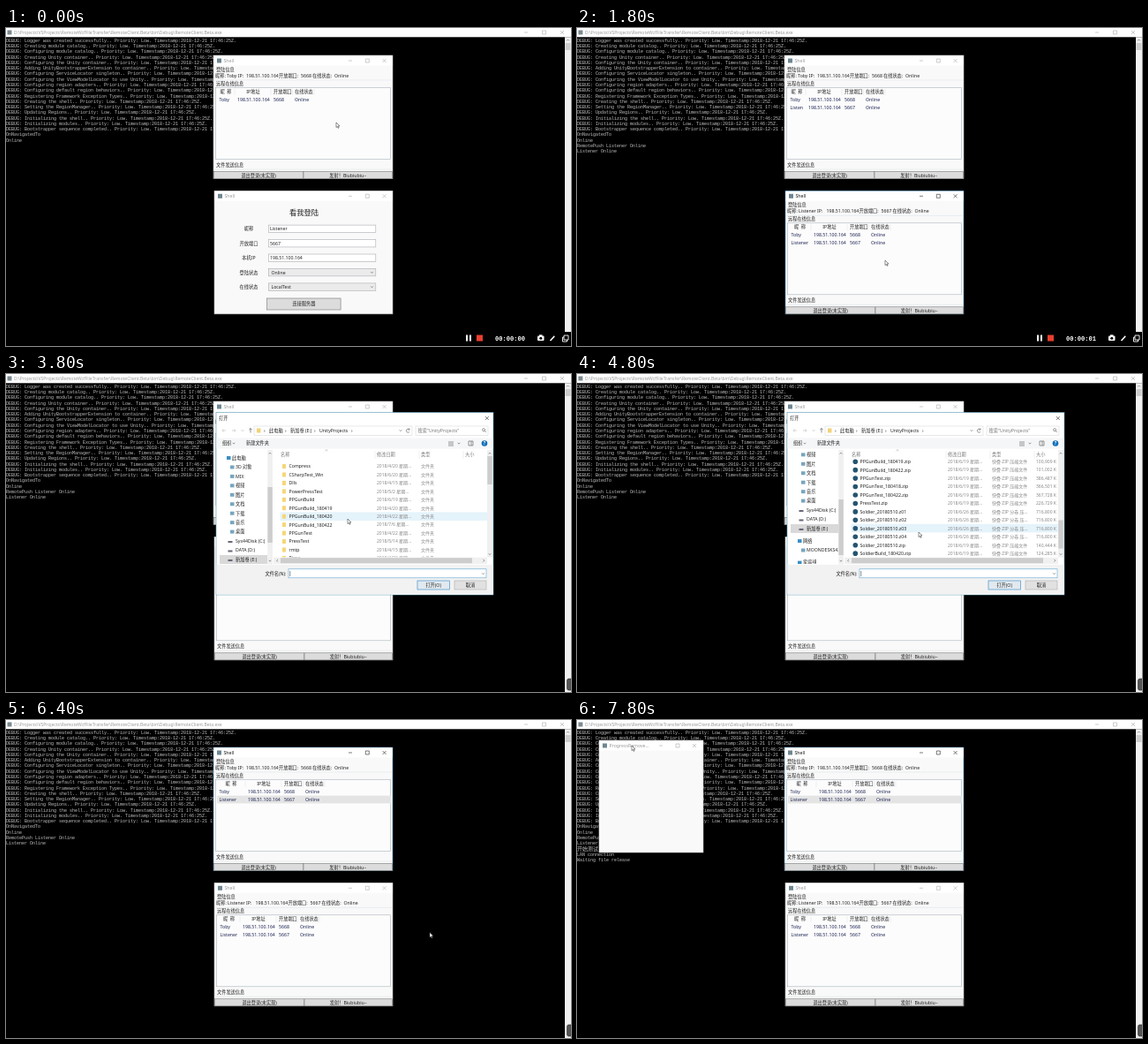
An HTML page that plays this animation: 640x360 px, repeating every 8000 ms.

```html
<!DOCTYPE html>
<html lang="zh">
<head>
<meta charset="utf-8">
<style>
html, body { margin: 0; width: 100%; height: 100%; overflow: hidden; background: #000; }
svg { display: block; width: 640px; height: 360px; font-family: "Noto Sans", "Noto Sans CJK SC", "Noto Sans CJK", sans-serif; }
text { white-space: pre; }
.mono { font-family: "Liberation Mono", "Noto Sans CJK SC", "Noto Sans CJK", monospace; }
.frame { stroke: #bbb; }
.title { fill: #999; }
.buttons { stroke: #aaa; }
.active .frame { stroke: #3f86b5; }
.active .title { fill: #111; }
.active .buttons { stroke: #222; }
</style>
</head>
<body>
<svg id="stage" viewBox="0 0 640 360"></svg>
<script>
const LOOP = 8000, STEP = 200;
const USER = 'Toby', PEER = 'Listener', IP = '198.51.100.164';
const ROW = 9.45, LAST_SCROLL = 251, SIDE_SCROLL = 35;

// y is the vertical middle of the text
const text = (x, y, s, { size = 5.2, fill = '#222', anchor = 'start', cls = '', weight = 400 } = {}) =>
  `<text x="${x}" y="${y + size * 0.36}" font-size="${size}" fill="${fill}" text-anchor="${anchor}" font-weight="${weight}" class="${cls}">${s}</text>`;
const center = (x, y, s, o = {}) => text(x, y, s, { ...o, anchor: 'middle' });
const rect = (x, y, w, h, fill, stroke = 'none', extra = '') =>
  `<rect x="${x}" y="${y}" width="${w}" height="${h}" fill="${fill}" stroke="${stroke}" stroke-width=".6" ${extra}/>`;
const path = (d, stroke = '#555', width = 0.6, fill = 'none') =>
  `<path d="${d}" fill="${fill}" stroke="${stroke}" stroke-width="${width}"/>`;
const circle = (x, y, r, fill) => `<circle cx="${x}" cy="${y}" r="${r}" fill="${fill}"/>`;
const chevron = (x, y, color = '#555') => path(`M${x - 1.3} ${y - 0.7}l1.3 1.4 1.3 -1.4`, color);
const group = (id, body, extra = '') => `<g id="${id}" ${extra}>${body}</g>`;
const clip = (id, x, y, w, h) => `<clipPath id="${id}">${rect(x, y, w, h, '#000')}</clipPath>`;

const windowButtons = (x, y, gap) =>
  `<path class="buttons" fill="none" stroke-width=".6" d="M${x - 2} ${y}h4M${x + gap - 2} ${y - 2}h4v4h-4zM${x + 2 * gap - 2} ${y - 2}l4 4m0 -4l-4 4"/>`;

function appWindow(x, y, w, h, title, buttonsX, gap) {
  return rect(x, y, w, h, '#f9f9f9', '', 'class="frame"').replace('stroke="" ', '') +
    rect(x + 0.5, y + 0.5, w - 1, 11, '#fff') +
    rect(x + 4, y + 3.5, 5, 5, '#6f8791') +
    `<text class="title" x="${x + 11.5}" y="${y + 8}" font-size="5.2">${title}</text>` +
    windowButtons(buttonsX, y + 6, gap);
}
const shellWindow = (x, y) => appWindow(x, y, 203 - (x - 235), 139.5, 'Shell', 390, 19.3);

// Rows of online users; spread widens the name column
function userTable(x, y, spread, cut) {
  const port = 68 + spread, state = 92 + spread;
  const ink = { fill: '#1c2352' };
  const row = (dy, name, portNo) =>
    text(x + 6.5, y + dy, name, ink) + text(x + 27 + spread, y + dy, IP, ink) +
    text(x + port, y + dy, portNo, ink) + text(x + state, y + dy, 'Online', ink);
  const lines = [24, 65, 89.5, 114].map(c => `M${x + c + spread} ${y + 38}v7`).join('');
  return path(lines, '#dde3e8', 0.5) +
    center(x + 14 + spread / 2, y + 41, '昵  称') + center(x + 45 + spread, y + 41, 'IP地址') +
    text(x + port, y + 41, '开放端口') + text(x + state, y + 41, '在线状态') +
    row(50, USER, 5668) + row(59, PEER.slice(0, cut), 5667);
}

function shellBody(x, y, name, portNo, shift) {
  const right = 438 - x;
  const button = (bx, w, s) => rect(bx, y + 131.5, w, 8, '#dcdcdc', '#777') + center(bx + w / 2, y + 135.7, s);
  return path(`M${x + 1} ${y + 28}h${right - 2}M${x + 1} ${y + 129}h${right - 2}`, '#d5dce2', 0.5) +
    text(x + 3, y + 16.3, '登陆信息') +
    text(x + 2, y + 23.3, `昵称: ${name} IP:`) + text(x + 37 + shift, y + 23.3, IP) +
    text(x + 74 + shift, y + 23.3, '开放端口:') + text(x + 99 + shift, y + 23.3, portNo) +
    text(x + 112 + shift, y + 23.3, '在线状态:') + text(x + 137 + shift, y + 23.3, 'Online') +
    text(x + 3, y + 32.3, '远程在线信息') +
    rect(x + 2.5, y + 36.5, right - 5, 81, '#fcfcfc', '#a9b4be') +
    text(x + 3, y + 124.2, '文件发送信息') +
    button(x + 0.4, 101.5, '退出登录(未实现)') + button(x + 102, right - 102.4, '发射！Biubiubiu~');
}

function loginBody() {
  const fields = [['昵称', PEER], ['开放端口', 5667], ['本机IP', IP], ['登陆状态', 'Online'], ['在线状态', 'LocalTest']];
  return center(337.5, 209, '看我登陆', { size: 8.3 }) + fields.map(([label, value], i) => {
    const y = 227.3 + i * 16.45, combo = i > 2;
    return center(275, y, label) + rect(297.3, y - 4.2, 121.5, 8.4, combo ? '#ebebeb' : '#fff', '#abadb3') +
      text(combo ? 300.5 : 299, y, value) + (combo ? chevron(414.5, y) : '');
  }).join('') + rect(295.6, 306, 83.5, 13, '#dcdcdc', '#777') + center(337.5, 312.6, '连接服务器');
}

function consoleView() {
  const steps = ['Logger was created successfully', 'Creating module catalog', 'Configuring module catalog',
    'Creating Unity container', 'Configuring the Unity container', 'Adding UnityBootstrapperExtension to container',
    'Configuring ServiceLocator singleton', 'Configuring the ViewModelLocator to use Unity', 'Configuring region adapters',
    'Configuring default region behaviors', 'Registering Framework Exception Types', 'Creating the shell',
    'Setting the RegionManager', 'Updating Regions', 'Initializing the shell', 'Initializing modules',
    'Bootstrapper sequence completed'];
  const line = (s, i, size = 5) => text(0, 14 + i * 6.27, s, { size, fill: '#c4c4c4', cls: 'mono' });
  return rect(0, 0, 640, 360, '#000') + rect(0, 0, 640, 10.3, '#fff') + rect(1.5, 2.5, 5, 5, '#7c8a90') +
    text(9, 5.2, 'D:\\Projects\\VSProjects\\RemoteWcfFileTransfer\\RemoteClient.Beta\\bin\\Debug\\RemoteClient.Beta.exe', { size: 5, fill: '#999' }) +
    `<g stroke="#999">${windowButtons(589, 5, 20.5)}</g>` +
    rect(633, 10.3, 7, 349.7, '#f0f0f0') + rect(633.5, 17, 6, 8, '#cdcdcd') +
    path('M635 14.5l1.5 -1.5 1.5 1.5') +
    steps.map((s, i) => line(`DEBUG: ${s}.. Priority: Low. Timestamp:2018-12-21 17:46:25Z.`, i)).join('') +
    line('OnNavigatedTo', 17) + line('Online', 18) +
    group('joined', line(`RemotePush ${PEER} Online`, 19) + line(`${PEER} Online`, 20)) +
    group('testing', line('开始测试', 21, 6) + line('LAN connection', 22) + line('Waiting file release', 23));
}

function fileRows() {
  const folders = ['Compress', 'CSharpTest_Win', 'Dlls', 'PowerPressTest', 'PPGunBuild', 'PPGunBuild_180419', 'PPGunBuild_180420',
    'PPGunBuild_180422', 'PPGunTest', 'PressTest', 'rmtp', 'Rtmp', 'Soldier', 'SoldierBuild', 'SoldierTest', 'Tools'];
  const files = ['Compress.zip', 'CSharpTest.zip', 'Dlls.zip', 'PowerPress.zip', 'PPGun_01.zip', 'PPGun_02.zip', 'PPGun_03.zip',
    'PPGun_04.zip', 'PPGunBuild.zip', 'PPGunBuild_180418.zip', 'PPGunBuild_180419.zip', 'PPGunBuild_180422.zip', 'PPGunTest.zip',
    'PPGunTest_180418.zip', 'PPGunTest_180422.zip', 'PressTest.zip', 'Soldier_20180510.z01', 'Soldier_20180510.z02',
    'Soldier_20180510.z03', 'Soldier_20180510.z04', 'Soldier_20180510.zip', 'SoldierBuild_180420.zip'];
  const dates = ['4/20', '6/20', '4/15', '5/2', '6/19', '4/20', '4/22', '7/6', '4/22', '5/14', '4/15'];
  const sizes = ['100,909', '101,002', '386,487', '366,501', '367,728', '226,729', '716,800', '716,800', '716,800', '716,800', '140,444', '124,285'];
  const pale = { fill: '#888', size: 5 };
  return [...folders, ...files].map((name, i) => {
    const y = 104.5 + i * ROW, n = i - folders.length, split = /z0\d$/.test(name);
    const icon = n < 0 ? rect(313, y - 2.5, 4, 5, '#f5d67b') : circle(315.3, y, 2.8, '#24546f');
    const date = n < 0 ? dates[i % dates.length] : split ? '6/26' : '6/19';
    return icon + text(320.5, y, name) + text(420, y, `2018/${date} 星期...`, pale) +
      text(470, y, n < 0 ? '文件夹' : split ? '快叠 ZIP 分卷 压...' : '快叠 ZIP 压缩文件', pale) +
      (n < 0 ? '' : text(520, y, `${sizes[(n + 2) % 12]} K`, pale));
  }).join('');
}

function sidebar() {
  const items = [['此电脑', 0], ['3D 对象', 1], ['MIX', 2], ['视频', 3], ['图片', 4], ['文档', 5], ['下载', 6], ['音乐', 7], ['桌面', 8],
    ['Sys44Disk (C:)', 9], ['DATA (D:)', 10], ['新加卷 (E:)', 11], ['网络', 12.35], ['MOONDESKS42', 13.35], ['家庭组', 14.7]];
  return rect(242, 205, 54, 10, '#d9d9d9') + items.map(([s, i]) => {
    const y = 95 + i * 10.45, top = /此电脑|网络|家庭组/.test(s), x = top ? 256 : 260;
    const icon = /:\)/.test(s) ? rect(251.5, y, 5, 2, '#667') : rect(x - 6, y - 2, 4.5, 4, top ? '#3a8fc4' : '#78a5bd');
    return icon + text(x, y, s);
  }).join('');
}

function dialog() {
  const gray = { fill: '#777' };
  const scrollBar = (x, y, w, h) => rect(x, y, w, h, '#f0f0f0');
  return rect(238, 43.5, 314, 206.5, '#fff', '#5d9dbb') +
    text(241, 50, '打开') + path('M542.8 48l4 4m0 -4l-4 4', '#222') +
    path('M249 64h-4m1.5 -1.5l-1.5 1.5 1.5 1.5M256 64h4m-1.5 -1.5l1.5 1.5 -1.5 1.5', '#bbb') +
    path('M277 66.5v-5m-1.7 1.7l1.7 -1.7 1.7 1.7', '#444') + chevron(268, 64, '#aaa') +
    rect(281, 59, 179, 10.5, '#fff', '#d9d9d9') + rect(284, 61.5, 4.5, 5, '#f2d27b') +
    text(292, 64, '›') + text(298, 64, '此电脑') + text(316, 64, '›') + text(322, 64, '新加卷 (E:)') +
    text(349, 64, '›') + text(355, 64, 'UnityProjects') + text(391, 64, '›') +
    chevron(447, 64) + path('M457 63a2 2 0 1 0 0 2.4m0 -4v1.7h-1.6') +
    rect(464, 59, 82, 10.5, '#fff', '#d9d9d9') + text(466.5, 64, '搜索"UnityProjects"', gray) +
    path('M542.6 63.2a1.5 1.5 0 1 0 -3 0a1.5 1.5 0 1 0 3 0m-.5 1l1.7 1.8') +
    rect(238.5, 72.5, 313, 12, '#f5f6f7') + text(245, 78.5, '组织') + chevron(258, 78.5) + text(272, 78.5, '新建文件夹') +
    path('M501 77h6m-6 2h6m-6 2h6M524 76h5v5h-5zM527 76v5') + chevron(513, 78.5) +
    circle(542, 78.5, 3.3, '#1470b8') + center(542, 78.5, '?', { fill: '#fff', weight: 700 }) +
    text(311, 91.5, '名称', gray) + text(420, 91.5, '修改日期', gray) + text(470, 91.5, '类型', gray) + text(520, 91.5, '大小', gray) +
    path('M361.5 87l1.5 -1.3 1.5 1.3', '#999') + path('M418 87v9M468 87v9M518 87v9', '#e5e5e5') +
    `<g clip-path="url(#sideClip)">${group('side', sidebar())}</g>` +
    scrollBar(296.2, 86, 5.8, 129.5) + group('sideThumb', rect(296.4, 128, 5.4, 63, '#cdcdcd')) +
    chevron(299, 211.5) + path('M297.7 90.5l1.3 -1.4 1.3 1.4') +
    `<g clip-path="url(#listClip)">${rect(310.5, 0, 234.5, 9.6, '', 'none', 'id="hover"')}${group('files', fileRows())}</g>` +
    scrollBar(545, 86, 6, 121.5) + group('listThumb', rect(545.3, 93, 5.4, 32, '#cdcdcd')) +
    chevron(548, 204) + path('M546.7 90.5l1.3 -1.4 1.3 1.4') +
    scrollBar(303, 207.7, 242, 7.3) + rect(311, 208.2, 217, 6, '#cdcdcd') +
    path('M308 209.8l-1.4 1.4 1.4 1.4M540.5 209.8l1.4 1.4 -1.4 1.4') +
    rect(238.5, 215.8, 313, 33.8, '#f2f2f2') +
    text(317.5, 226, '文件名(N):', { anchor: 'end' }) + rect(320, 220.8, 224, 10, '#fff', '#5fa4d2') + chevron(540.5, 226) +
    group('caret', path('M321.8 223v6', '#222', 0.5)) + group('fileName', text(321, 226, 'Soldier_20180510.z03')) +
    rect(466, 234, 36.5, 10, '#e1e9ef', '#1c7cc4', 'stroke-opacity=".9"') + center(484.2, 239.2, '打开(O)') +
    rect(508, 234, 36, 10, '#e1e1e1', '#adadad') + center(526, 239.2, '取消');
}

function recorder() {
  return rect(515, 344, 125, 16, '#000') + rect(521, 347.5, 2, 7, '#fff') + rect(525, 347.5, 2, 7, '#fff') +
    rect(533, 347.5, 7, 7, '#e8402f') +
    '<text id="clock" class="mono" x="554" y="354" font-size="7.1" font-weight="700" fill="#fff"></text>' +
    rect(602, 348.5, 7.5, 5.5, '#fff', 'none', 'rx="1"') + rect(604, 347.3, 3.5, 2, '#fff') + circle(605.8, 351.2, 1.5, '#000') +
    path('M616.5 354l4.8 -5.2', '#fff', 1.6) + path('M632 348h5v5h-5zM632 350h-1.5v5h5v-2', '#fff', 0.9);
}

const stage = document.getElementById('stage');
stage.innerHTML = `<defs>${clip('sideClip', 239, 86, 57, 129)}${clip('listClip', 303, 96, 242, 111.5)}</defs>` +
  consoleView() +
  group('upper', shellWindow(235, 31) + shellBody(235, 31, USER, 5668, 0) +
    group('picked', rect(239, 85.6, 197, 8.8, '#e4e4e4')) +
    group('solo', rect(238, 84, 150, 12, '#fcfcfc')) +
    group('narrow', userTable(235, 31, 0, 6)) + group('wide', userTable(235, 31, 12, 8))) +
  group('lower', shellWindow(236, 184.3) + group('login', loginBody()) +
    group('online', shellBody(236, 184.3, PEER, 5667, 9.5) + userTable(236, 184.3, 5, 8))) +
  group('dialog', dialog()) +
  group('progress', appWindow(25, 23, 118, 127, 'ProgressRemove...', 95, 19)) +
  group('recorder', recorder()) +
  group('tab', rect(635.5, 345, 7, 13, '#555', '#222', 'rx="2"')) +
  group('cursor', path('M0 0v5.6l1.3 -1.2 .9 2 .9 -.4 -.9 -2h1.8z', '#222', 0.5, '#fff'));
// A lone user is shown until the second one signs in
const el = Object.fromEntries([...stage.querySelectorAll('[id]')].map(e => [e.id, e]));
el.upper.append(el.solo);

const cursorKeys = [[0, 374, 107], [200, 374, 107], [900, 338, 311], [1200, 338, 311], [1800, 349, 263], [2200, 260, 72], [2400, 260, 72],
  [2800, 262, 89], [3000, 262, 89], [3300, 387, 164], [3800, 387, 164], [4600, 387, 179], [5200, 387, 179],
  [5800, 437, 222], [6000, 480, 240], [6700, 480, 241], [7600, 62, 29], [LOOP, 62, 29]];

const ramp = (t, a, b) => Math.min(1, Math.max(0, (t - a) / (b - a)));
const show = (id, on) => { el[id].style.display = on ? '' : 'none'; };
const move = (id, x, y) => el[id].setAttribute('transform', `translate(${x} ${y})`);

function cursorAt(t) {
  const i = cursorKeys.findIndex(k => k[0] > t);
  const [t0, x0, y0] = cursorKeys[i - 1], [t1, x1, y1] = cursorKeys[i];
  const p = ramp(t, t0, t1), e = p * p * (3 - 2 * p);
  return [x0 + (x1 - x0) * e, y0 + (y1 - y0) * e];
}

function draw(t) {
  const joined = t >= 1400, wide = t >= 2400, chosen = t >= 5200;
  const [x, y] = cursorAt(t);
  move('cursor', x, y);

  show('joined', joined);
  show('solo', !joined);
  show('login', !joined);
  show('online', joined);
  show('narrow', !wide);
  show('wide', wide);
  show('picked', t >= 2800);
  show('testing', t >= 7000);
  el.lower.classList.toggle('active', t >= 800 && t < 2400);
  el.upper.classList.toggle('active', t >= 2400 && t < 3400 || t >= 6200);

  show('dialog', t >= 3400 && t < 6200);
  const notch = 3 * ROW;
  const scroll = Math.min(LAST_SCROLL, Math.ceil(ramp(t, 3800, 4600) * LAST_SCROLL / notch) * notch);
  move('files', 0, -scroll);
  move('listThumb', 0, 72.5 * scroll / LAST_SCROLL);
  const sideMoved = t >= 4000;
  move('side', 0, sideMoved ? -SIDE_SCROLL : 0);
  move('sideThumb', 0, sideMoved ? 14 : 0);
  const done = scroll === LAST_SCROLL;
  el.hover.setAttribute('y', done ? 169.8 : 156.4);
  el.hover.setAttribute('fill', chosen ? '#cce8ff' : '#e5f3fb');
  show('caret', !chosen);
  show('fileName', chosen);

  const fade = ramp(t, 6400, 6800);
  const scale = 0.96 + 0.04 * fade;
  el.progress.setAttribute('opacity', fade);
  el.progress.setAttribute('transform', `translate(84 86.5) scale(${scale}) translate(-84 -86.5)`);

  show('recorder', t < 2600);
  show('tab', t >= 2600);
  el.clock.textContent = `00:00:0${Math.floor(t / 1000)}`;
}

function tick(now) {
  draw(Math.floor((now % LOOP) / STEP) * STEP);
  requestAnimationFrame(tick);
}
draw(0);
requestAnimationFrame(tick);
</script>
</body>
</html>
```
